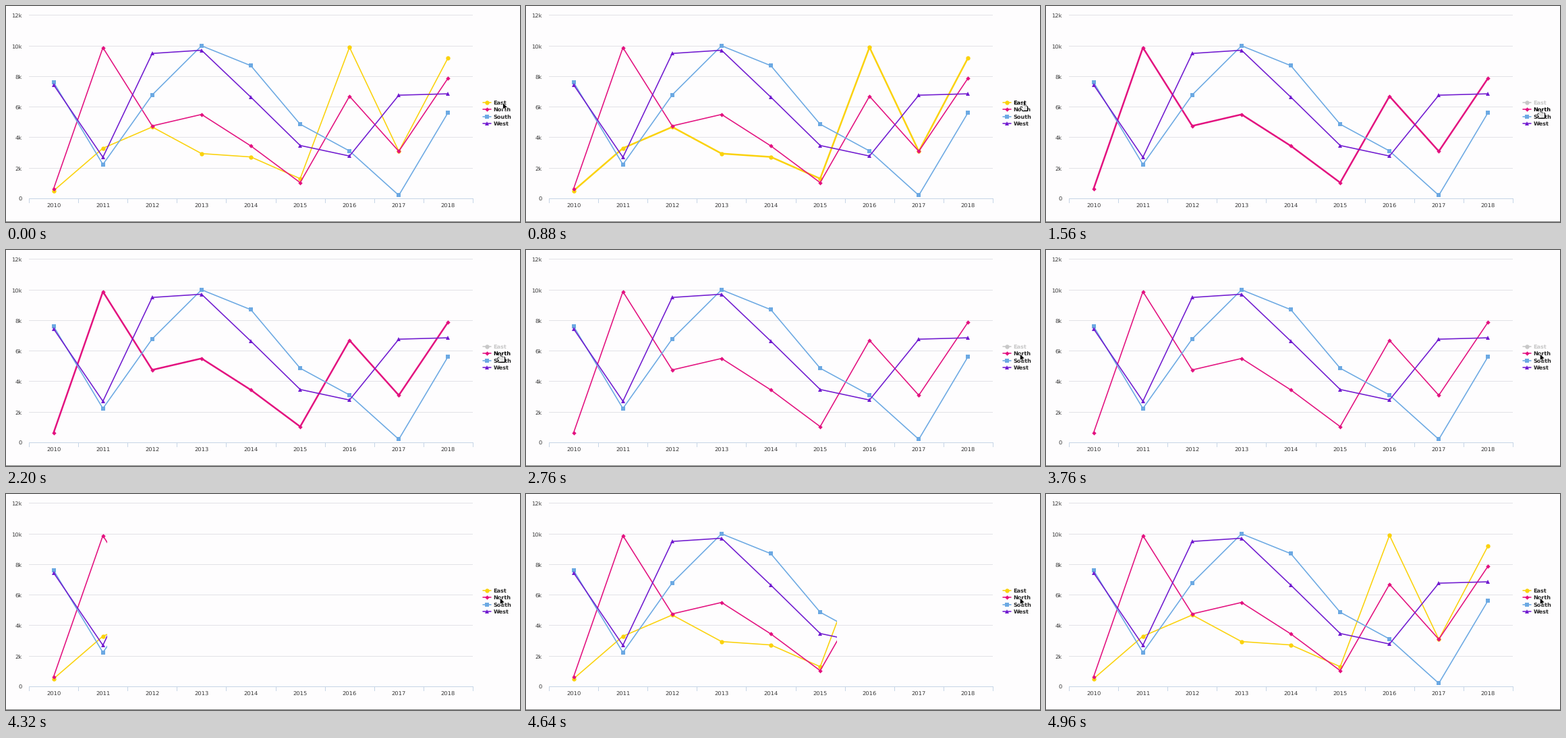
A matplotlib script for the animation above (5000 ms loop, 762 by 320 pixels).

```python
import math

import matplotlib.pyplot as plt
from matplotlib.animation import FuncAnimation
from matplotlib.collections import LineCollection
from matplotlib.patches import Polygon, Rectangle
from matplotlib.transforms import Affine2D

W, H, DPI = 762, 320, 100
PT = 72 / DPI  # points per pixel
STEP, FRAMES = 40, 125

LEFT, RIGHT, BASE = 34, 692, 285
CELL = (RIGHT - LEFT) / 9
PER_K = 22.65
BG, GRID, AXIS, HIDDEN = "#fefdfe", "#e2e2e7", "#c6d5e6", "#c8c8c8"
THIN, THICK, MARK = 1.6, 2.5, 6.4

# name, colour, marker, sales in thousands per year
SERIES = [
    ("East", "#fbd20c", "o", [.5, 3.28, 4.67, 2.93, 2.71, 1.29, 9.88, 3.08, 9.2]),
    ("North", "#e3117f", "D", [.63, 9.86, 4.74, 5.49, 3.43, 1.03, 6.68, 3.08, 7.87]),
    ("South", "#6ca9e3", "s", [7.59, 2.22, 6.77, 9.98, 8.68, 4.85, 3.1, .2, 5.62]),
    ("West", "#711bd0", "^", [7.43, 2.69, 9.48, 9.69, 6.62, 3.46, 2.77, 6.75, 6.84]),
]

# Event times in ms
EAST_OVER, EAST_CLICK = 480, 1000
MOVE_START, NORTH_OVER, MOVE_END = 1120, 1280, 1360
NORTH_OUT, CLEAR, RELOAD = 2560, 3920, 4320
REVEAL_START, REVEAL_TIME = 4044, 1000

plt.rcParams["font.family"] = "DejaVu Sans"
plt.rcParams["text.hinting"] = "none"

fig = plt.figure(figsize=(W / DPI, H / DPI), dpi=DPI, facecolor=BG)
ax = fig.add_axes([0, 0, 1, 1])
ax.set_xlim(0, W)
ax.set_ylim(H, 0)
ax.axis("off")


def bar(x, y, w, h, color, z=1):
    return ax.add_patch(Rectangle((x, y), w, h, fc=color, lw=0, zorder=z))


def label(x, y, text, ha, color="#3a3a3a", size=8.4, weight="normal"):
    return ax.text(x, y, text, ha=ha, va="baseline", color=color,
                   fontsize=size * PT, fontweight=weight, zorder=3)


def trace(x, y, color, marker):
    # A diamond is a turned square, so its side is shorter than its width.
    size = MARK / math.sqrt(2) if marker == "D" else MARK
    return ax.plot(x, y, color=color, lw=THIN * PT, marker=marker,
                   ms=size * PT, mew=0, solid_joinstyle="round",
                   solid_capstyle="round", zorder=2)[0]


def ease(t):
    t = min(max(t, 0), 1)
    return (1 - math.cos(math.pi * t)) / 2


def draw_axes():
    for k in range(0, 13, 2):
        y = int(BASE - k * PER_K + .5)
        bar(LEFT, y, RIGHT - LEFT, 1, GRID if k else AXIS)
        label(23.5, y + 4, f"{k}k" if k else "0", "right")
    for i in range(10):
        x = LEFT + i * CELL
        bar(int(x + .5), BASE, 1, 7, AXIS)
        if i < 9:
            label(x + CELL / 2, 299, str(2010 + i), "center")


def draw_series(n, name, color, marker, values):
    line = trace([LEFT + (i + .5) * CELL for i in range(9)],
                 [BASE - v * PER_K for v in values], color, marker)
    y = 142.5 + 10.5 * n
    key = trace([707, 713, 719], [y] * 3, color, marker)
    key.set_markevery([1])
    text = label(722.6, y + 3.2, name, "left", size=8.1, weight="bold")
    return line, key, text


def draw_pointers(transform):
    arrow = Polygon([(0, 0), (0, 10.4), (2.3, 8.3), (4, 12.2), (5.7, 11.4),
                     (4.1, 7.6), (7.2, 7.4)], fc="black", ec="white",
                    lw=.7 * PT, transform=transform, zorder=6)
    ax.add_patch(arrow)
    # Fingers and thumb as round strokes, white over a wider black.
    fingers = [[(1.8 * k, 4.4 + .4 * k if k else 1.2), (1.8 * k, 11)]
               for k in range(4)]
    strokes = fingers + [[(-2.6, 7.4), (.6, 11)]]
    hand = [LineCollection(strokes, colors=color, linewidths=width * PT,
                           capstyle="round", transform=transform, zorder=z)
            for color, width, z in (("black", 3.4, 6), ("white", 1.8, 7))]
    for layer in hand:
        ax.add_collection(layer, autolim=False)
    return arrow, hand


draw_axes()
bar(0, H - 1, W, 1, "#808080")
parts = [draw_series(n, *row) for n, row in enumerate(SERIES)]
cover = bar(0, 0, W, H - 2, BG, z=5)
shift = Affine2D()
arrow, hand = draw_pointers(shift + ax.transData)


def move_pointer(ms):
    u = ease((ms - MOVE_START) / (MOVE_END - MOVE_START))
    shift.clear().translate(736.6 - 4.3 * u, 143 + 10.5 * u)
    over = EAST_OVER <= ms < NORTH_OUT
    arrow.set_visible(not over)
    for layer in hand:
        layer.set_visible(over)


def update(frame):
    ms = frame * STEP
    hover = None
    if EAST_OVER <= ms < EAST_CLICK:
        hover = 0
    elif NORTH_OVER <= ms < NORTH_OUT:
        hover = 1

    edge = W
    if ms >= RELOAD:
        edge = LEFT + (RIGHT - LEFT) * ease((ms - REVEAL_START) / REVEAL_TIME)
    window = Rectangle((0, H), edge, -H, transform=ax.transData)

    for n, (line, key, text) in enumerate(parts):
        off = n == 0 and EAST_CLICK <= ms < RELOAD
        line.set_visible(not off)
        line.set_linewidth((THICK if n == hover else THIN) * PT)
        line.set_clip_path(window)
        key.set_color(HIDDEN if off else SERIES[n][1])
        text.set_color(HIDDEN if off else "black" if n == hover else "#262626")

    cover.set_visible(CLEAR <= ms < RELOAD)
    move_pointer(ms)


anim = FuncAnimation(fig, update, frames=FRAMES, interval=STEP,
                     repeat=True, repeat_delay=0, blit=False)
plt.show()
```
